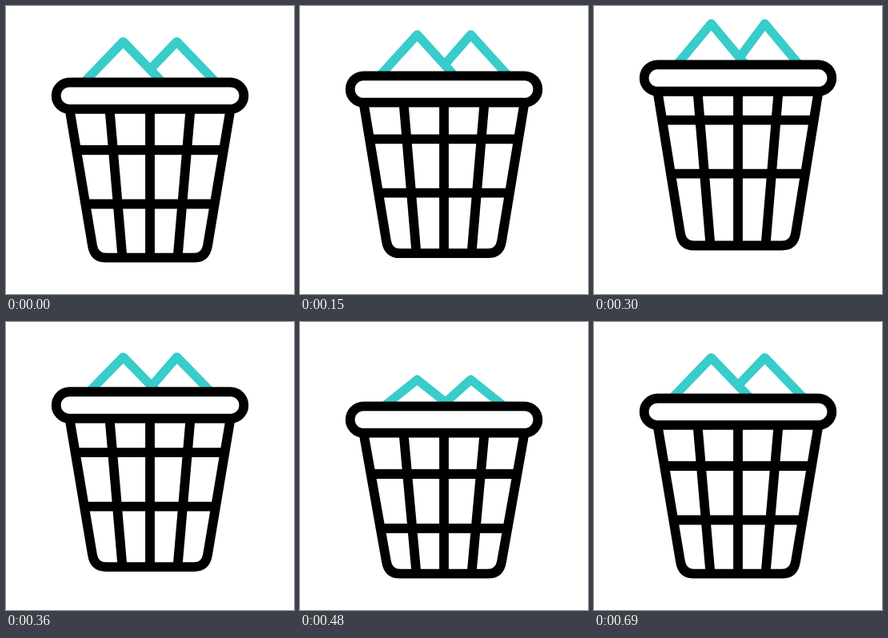
An HTML page that plays this animation: 360x360 px, repeating every 1.32 s.

```html
<!DOCTYPE html>
<html lang="en">
<head>
<meta charset="utf-8">
<title>Bouncing basket</title>
<style>
  html, body { margin: 0; width: 100%; height: 100%; overflow: hidden; background: #fff; }
  svg { display: block; width: 100%; height: 100%; }
  path, rect { fill: none; stroke: #000; stroke-width: 11.8; stroke-linejoin: round; }
  #paper { stroke: #38cccb; stroke-width: 11.2; }
  #rim { fill: #fff; }
</style>
</head>
<body>
<svg viewBox="0 0 360 360">
  <path id="paper"/>
  <path id="basket"/>
  <rect id="rim" x="62.7" width="234.6" height="33.4" rx="16.7"/>
</svg>
<script>
const LOOP = 1320, TICK = 30;
const [paper, basket, rim] = ['paper', 'basket', 'rim'].map(id => document.getElementById(id));

// Each track: rest, top of the hop, landing squash
const tracks = {
  top: [112.2, 88, 122],
  peak: [44.5, 18.8, 72],
  slope: [1.04, 1.22, 0.8],
  slide: [0, 2, 2],
  row1: [180, 139.5, 190],
  row2: [247.5, 206.5, 258],
  base: [314.7, 298.5, 314.7]
};

const smooth = u => u * u * (3 - 2 * u);

// Every sixth tick repeats the previous step
function stepAt(ms) {
  const n = Math.floor(ms / TICK);
  return n < 1 ? 0 : Math.min(20, n - Math.floor((n - 1) / 6));
}

function poseAt(step) {
  let from, to, k;
  if (step < 8) [from, to, k] = [0, 1, smooth((step / 8) ** 2)];
  else if (step < 14) [from, to, k] = [1, 2, smooth(((step - 8) / 6) ** 1.06)];
  else [from, to, k] = [2, 0, smooth(((step - 14) / 6) ** 0.7)];
  const pose = {};
  for (const name in tracks) {
    const t = tracks[name];
    pose[name] = t[from] + (t[to] - t[from]) * k;
  }
  return pose;
}

function draw({ top, peak, slope, slide, row1, row2, base }) {
  const foot = top - 10, reach = (foot - peak) / slope;
  paper.setAttribute('d',
    `M${146.5 - reach} ${foot}L146.5 ${peak}L${146.5 + reach} ${foot}` +
    `M${180 + slide} ${peak + (33.5 + slide) * slope}L213.5 ${peak}L${213.5 + reach} ${foot}`);

  const lip = top + 17, bend = base - 15;
  const row = y => {
    const x = 79.5 + 28.5 * (y - lip) / (bend - lip);
    return `M${x} ${y}H${360 - x}`;
  };
  basket.setAttribute('d',
    `M79.5 ${lip}L108 ${bend}Q110.5 ${base} 125 ${base}H235` +
    `Q249.5 ${base} 252 ${bend}L280.5 ${lip}` +
    `M129.5 ${lip}L145.5 ${base}M180 ${lip}V${base}M230.5 ${lip}L214.5 ${base}` +
    row(row1) + row(row2));

  rim.setAttribute('y', top - 16.7);
}

function frame() {
  draw(poseAt(stepAt(performance.now() % LOOP)));
  requestAnimationFrame(frame);
}
frame();
</script>
</body>
</html>
```
